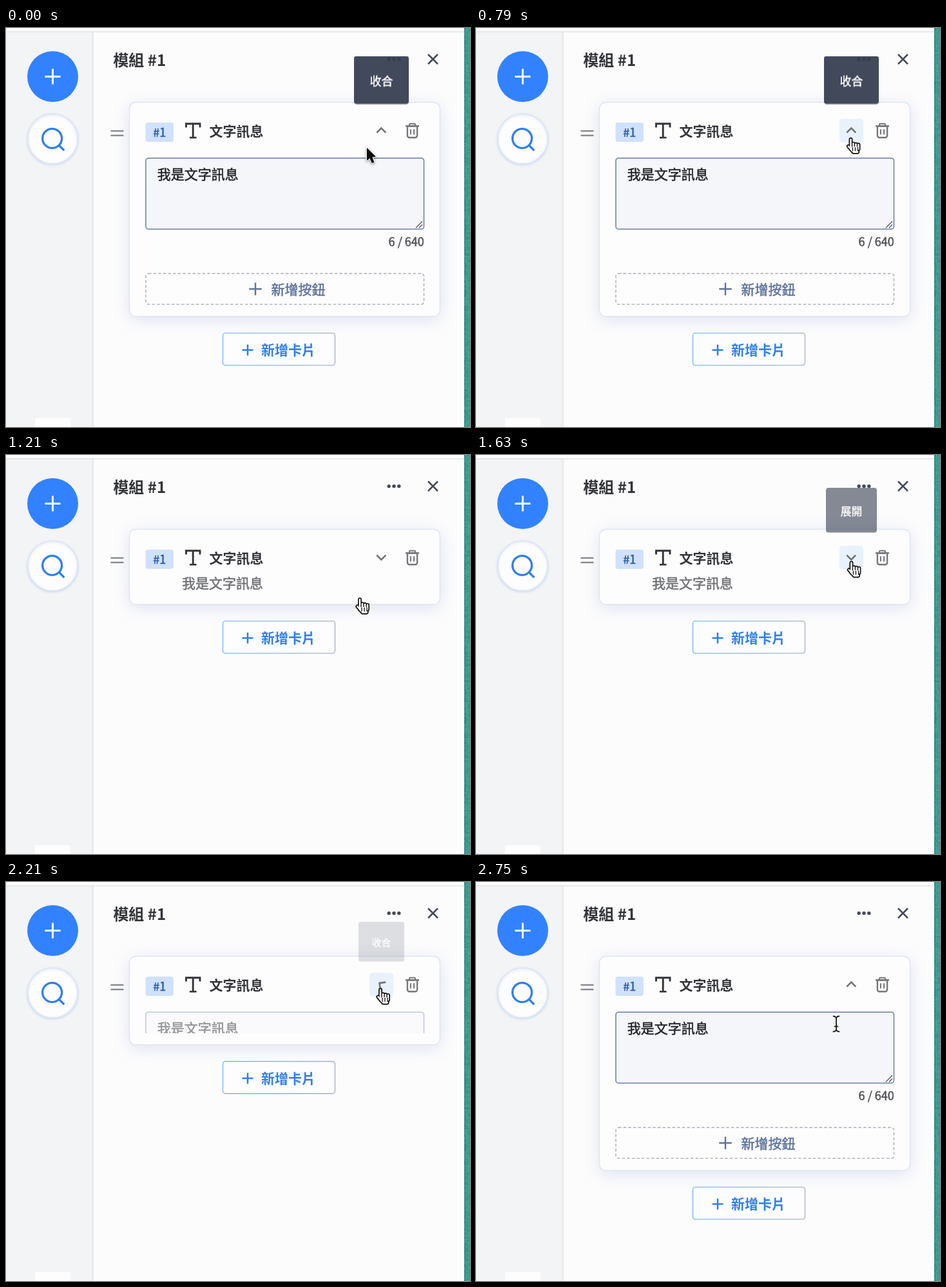
An HTML page with a canvas for the animation above (2.79 s loop, 720 by 620 pixels).

```html
<!DOCTYPE html>
<html lang="zh-Hant">
<head>
<meta charset="utf-8">
<title>模組</title>
<style>
html, body { margin: 0; width: 100%; height: 100%; overflow: hidden; background: #f3f4f6; }
canvas { display: block; }
</style>
</head>
<body>
<canvas id="stage" width="720" height="620"></canvas>
<script>
const stage = document.getElementById('stage').getContext('2d');
let ctx = stage;
const LOOP = 2790, STEP = 1000 / 24;
const FONT = '"Noto Sans CJK TC", "Noto Sans CJK SC", "Noto Sans CJK JP", "Noto Sans CJK", sans-serif';
const BLUE = '#2f7fee', SLATE = '#5f739d', INK = '#333539', GREY = '#6f7175', PAPER = '#fdfdfe';

const clamp = v => Math.max(0, Math.min(1, v));
const mix = (a, b, p) => a + (b - a) * p;

function bezier(x1, y1, x2, y2) {
  const at = (a, b, s) => 3 * (1 - s) * (1 - s) * s * a + 3 * (1 - s) * s * s * b + s * s * s;
  return x => {
    if (x <= 0 || x >= 1) return clamp(x);
    let lo = 0, hi = 1;
    for (let i = 0; i < 24; i++) {
      const s = (lo + hi) / 2;
      if (at(x1, x2, s) < x) lo = s; else hi = s;
    }
    return at(y1, y2, lo);
  };
}
const standard = bezier(.4, 0, .2, 1);
const enter = bezier(0, 0, .2, 1);
const leave = bezier(.4, 0, 1, 1);

// Click times; the card starts to resize a little later
const SHUT = 1025, OPEN = 2141, LAG = 14;
const folded = t => t >= SHUT && t < OPEN;

// Tooltip stays: shown from, hidden at
const TIPS = [[-400, 0], [530, SHUT], [1580, OPEN]];

// Pointer stops: time, x, y
const STOPS = [
  [0, 560, 186], [200, 553, 214], [490, 581.5, 172], [1041, 581.5, 170],
  [1208, 549, 222], [1560, 582.5, 165], [2215, 581, 165], [2560, 559, 220.5]
];

function pointerAt(t) {
  const i = STOPS.findLastIndex(s => s[0] <= t);
  const [t0, x0, y0] = STOPS[i], [t1, x1, y1] = STOPS[i + 1] || [LOOP, x0, y0];
  const p = standard((t - t0) / (t1 - t0));
  const x = mix(x0, x1, p), y = mix(y0, y1, p);
  const hover = x > 564 && x < 601 && y > 141 && y < 178;
  const overHeader = folded(t) && y < 232;
  const kind = hover || overHeader ? 'hand' : !folded(t) && y > 202 ? 'beam' : 'arrow';
  return { x, y, hover, kind };
}

function text(s, x, y, size, color, weight = 400, align = 'left') {
  ctx.font = `${weight === 700 ? 700 : 400} ${size}px ${FONT}`;
  ctx.textAlign = align;
  ctx.fillStyle = ctx.strokeStyle = color;
  ctx.fillText(s, x, y);
  if (weight === 500) {
    ctx.lineWidth = size * .025;
    ctx.strokeText(s, x, y);
  }
}

function line(color, width, ...points) {
  ctx.strokeStyle = color;
  ctx.lineWidth = width;
  ctx.beginPath();
  for (const [x, y] of points) ctx.lineTo(x, y);
  ctx.stroke();
}

function box(x, y, w, h, r, fill, stroke, width = 1.4) {
  ctx.beginPath();
  ctx.roundRect(x, y, w, h, r);
  if (fill) { ctx.fillStyle = fill; ctx.fill(); }
  if (stroke) { ctx.strokeStyle = stroke; ctx.lineWidth = width; ctx.stroke(); }
}

function disc(x, y, r, fill, stroke, width) {
  box(x - r, y - r, 2 * r, 2 * r, r, fill, stroke, width);
}

function shadow(color, blur, dy, draw) {
  ctx.save();
  ctx.shadowColor = color;
  ctx.shadowBlur = blur;
  ctx.shadowOffsetY = dy;
  draw();
  ctx.restore();
}

function plus(x, y, r, color, width) {
  line(color, width, [x - r, y], [x + r, y]);
  line(color, width, [x, y - r], [x, y + r]);
}

function layer(w, h, draw) {
  const c = document.createElement('canvas');
  c.width = w;
  c.height = h;
  ctx = c.getContext('2d');
  draw();
  ctx = stage;
  return c;
}

const strip = layer(9, 620, () => {
  let seed = 7;
  const rnd = () => (seed = seed * 16807 % 2147483647) / 2147483647;
  for (let y = 0; y < 620; y += 2) {
    for (let x = 0; x < 9; x += 2) {
      const v = (rnd() - .5) * 20 - (x < 2 ? 14 : 0);
      ctx.fillStyle = `rgb(${60 + v}, ${155 + v}, ${144 + v})`;
      ctx.fillRect(x, y, 2, 2);
    }
  }
});

const tipFor = label => layer(85, 75, () => {
  box(0, 0, 85, 74.5, 4, 'rgba(50,58,78,.92)');
  text(label, 42.5, 46, 18, '#fff', 500, 'center');
});
const tipShut = tipFor('收合'), tipOpen = tipFor('展開');

function drawShell() {
  ctx.fillStyle = '#f3f4f6';
  ctx.fillRect(0, 0, 720, 620);
  shadow('rgba(60,70,90,.16)', 5, 0, () => box(136, 0, 575, 620, 0, '#fcfcfd'));
  box(0, 0, 711, 5, 0, '#fdfdfd');
  box(0, 5, 711, 1.5, 0, '#e3e4e7');
  ctx.drawImage(strip, 711, 0);

  disc(72.5, 75.5, 39.5, '#3282ff');
  plus(72.5, 75.5, 12, '#fff', 3);
  shadow('rgba(60,110,190,.2)', 4, 1, () => disc(72.5, 172.5, 38.6, PAPER, '#dce6f5', 1.5));
  disc(71.6, 171.6, 15, null, BLUE, 3.3);
  line(BLUE, 3.3, [82, 182], [90.3, 190.3]);
  box(45, 606, 55, 30, 4, '#fdfdfd');

  text('模組 #1', 166.3, 59, 24, INK, 700);
  for (let i = -1; i <= 1; i++) disc(602 + i * 7.8, 48.5, 2.7, '#444b55');
  for (const d of [-7.5, 7.5]) line('#444b55', 2.5, [662.5 - d, 41], [662.5 + d, 56]);
}

function drawTrash(x, y) {
  const c = '#75777b';
  line(c, 2.4, [x - 10.5, y - 7], [x + 10.5, y - 7]);
  box(x - 4.5, y - 10.7, 9, 3.7, 1, null, c, 2);
  box(x - 7.6, y - 7, 15.2, 17.8, [0, 0, 3, 3], null, c, 2.4);
  for (const d of [-2.6, 2.6]) line(c, 2.1, [x + d, y - 2], [x + d, y + 6]);
}

function drawHeader(turn, hover, summary) {
  for (const y of [160, 167]) line('#87898d', 2.4, [162.5, y], [182.5, y]);
  box(216.5, 147, 43.5, 30, 4, '#d0e1fb');
  text('#1', 238.3, 169, 18, '#2b5ca8', 500, 'center');
  line(INK, 2.9, [279.5, 154.5], [279.5, 148.7], [301, 148.7], [301, 154.5]);
  line(INK, 2.9, [290.2, 148.7], [290.2, 171]);
  line(INK, 2.6, [285, 170.3], [295.5, 170.3]);
  text('文字訊息', 315.5, 168, 21, INK, 700);
  if (summary) text('我是文字訊息', 273, 207, 21, GREY, 500);

  if (hover) box(564, 141, 37, 37, 5, '#e9f2fc');
  ctx.save();
  ctx.translate(582.3, 159.2);
  ctx.rotate(-Math.PI * turn);
  line(GREY, 2.6, [-7, 3.5], [0, -3.5], [7, 3.5]);
  ctx.restore();
  drawTrash(630.5, 159.4);
}

function drawBody() {
  box(217, 202.2, 431.5, 110.3, 4, '#f5f6fa', '#667ca8', 1.5);
  text('我是文字訊息', 234.8, 234.5, 21, '#222427', 500);
  for (const d of [5, 10]) line('#55585e', 1.2, [646 - d, 310.5], [646, 310.5 - d]);
  text('6 / 640', 648.7, 339, 18, '#4d4f53', 500, 'right');
  ctx.setLineDash([4.6, 3]);
  box(217, 381.5, 431.5, 48, 4, null, '#a6abb8');
  ctx.setLineDash([]);
  plus(387, 405.5, 9.8, SLATE, 2.4);
  text('新增按鈕', 411.5, 414, 21, SLATE, 500);
}

function drawAddButton(y) {
  const edge = ctx.createLinearGradient(336, 0, 511, 0);
  edge.addColorStop(0, '#7db8f6');
  edge.addColorStop(1, '#a9b4c4');
  box(336.5, y, 174, 50, 4, PAPER, edge);
  plus(375, y + 26.3, 8.5, BLUE, 2.5);
  text('新增卡片', 396, y + 34.3, 21, BLUE, 700);
}

function drawCard(t, hover) {
  const summary = folded(t);
  const open = t < OPEN
    ? 1 - standard((t - SHUT - LAG) / 168)
    : standard((t - OPEN - LAG) / 225);
  const turn = t < OPEN
    ? standard((t - SHUT - LAG) / 150)
    : 1 - standard((t - OPEN) / 150);
  const dy = summary ? 30.3 : 0;
  const bottom = 202 + dy + 246.3 * open;

  shadow('rgba(70,95,165,.16)', 26, 5, () => box(191.5, 115.5, 482, bottom - 115.5, 10, PAPER));
  box(191.5, 115.5, 482, bottom - 115.5, 10, null, '#dee5f1');
  drawHeader(turn, hover, summary);

  if (open > 0) {
    ctx.save();
    ctx.beginPath();
    ctx.rect(192, 183 + dy, 481, bottom - 201 - dy);
    ctx.clip();
    ctx.globalAlpha = clamp(open * 2);
    ctx.translate(0, dy);
    drawBody();
    ctx.restore();
  }
  drawAddButton(bottom + 25.8);
}

function drawTip(t) {
  const [from, to] = TIPS.findLast(k => k[0] <= t);
  const shown = t < to ? enter((t - from) / 150) : 1 - leave((t - to) / 75);
  const scale = .8 + .2 * shown;
  ctx.save();
  ctx.globalAlpha = shown;
  ctx.translate(582.5, 152);
  ctx.scale(scale, scale);
  ctx.drawImage(folded(t) ? tipOpen : tipShut, -42.5, -108.5);
  ctx.restore();
}

function drawBeam(color, width) {
  line(color, width, [0, -10], [0, 10]);
  line(color, width, [-2.5, 4], [2.5, 4]);
  for (const s of [-1, 1]) line(color, width, [-4.5, 12 * s], [-2, 11.5 * s], [0, 9.5 * s], [2, 11.5 * s], [4.5, 12 * s]);
}

// Four fingers, a thumb and a palm; the wider dark pass leaves an outline
function drawHand(color, grow) {
  for (let i = 0; i < 4; i++) {
    line(color, 2.6 + grow, [i * 4, i ? 8.5 + i * .8 : 2.6], [i * 4, 18]);
  }
  line(color, 2.6 + grow, [-3.6, 13.5], [2, 20]);
  line(color, 8 + grow, [3.8, 18], [8, 18]);
  line(color, 4 + grow, [4.6, 22], [10, 22]);
}

function drawArrow() {
  line('#fff', 3.2, [0, 0], [0, 20], [4.5, 16], [7.8, 24], [11.4, 22.4], [8.1, 14.6], [14, 14], [0, 0]);
  ctx.fillStyle = '#0b0b0b';
  ctx.fill();
}

function drawPointer({ x, y, kind }) {
  ctx.save();
  ctx.translate(x, y);
  ctx.lineJoin = ctx.lineCap = 'round';
  if (kind === 'beam') {
    drawBeam('#fff', 4);
    drawBeam('#222', 1.9);
  } else if (kind === 'hand') {
    drawHand('#111', 3.4);
    drawHand('#fff', 0);
    for (let i = 1; i < 4; i++) line('#111', 1.3, [i * 4 - 1, 15.5], [i * 4 - 1, 20.5]);
  } else {
    shadow('rgba(0,0,0,.35)', 3, 1, drawArrow);
  }
  ctx.restore();
}

function draw(t) {
  const p = pointerAt(t);
  drawShell();
  drawCard(t, p.hover);
  drawTip(t);
  drawPointer(p);
}

const start = performance.now();
function tick() {
  const t = (performance.now() - start) % LOOP;
  // the picture advances at 24 steps a second
  draw(Math.min(66, Math.floor((t + 2) / STEP)) * STEP);
  requestAnimationFrame(tick);
}
tick();
</script>
</body>
</html>
```
